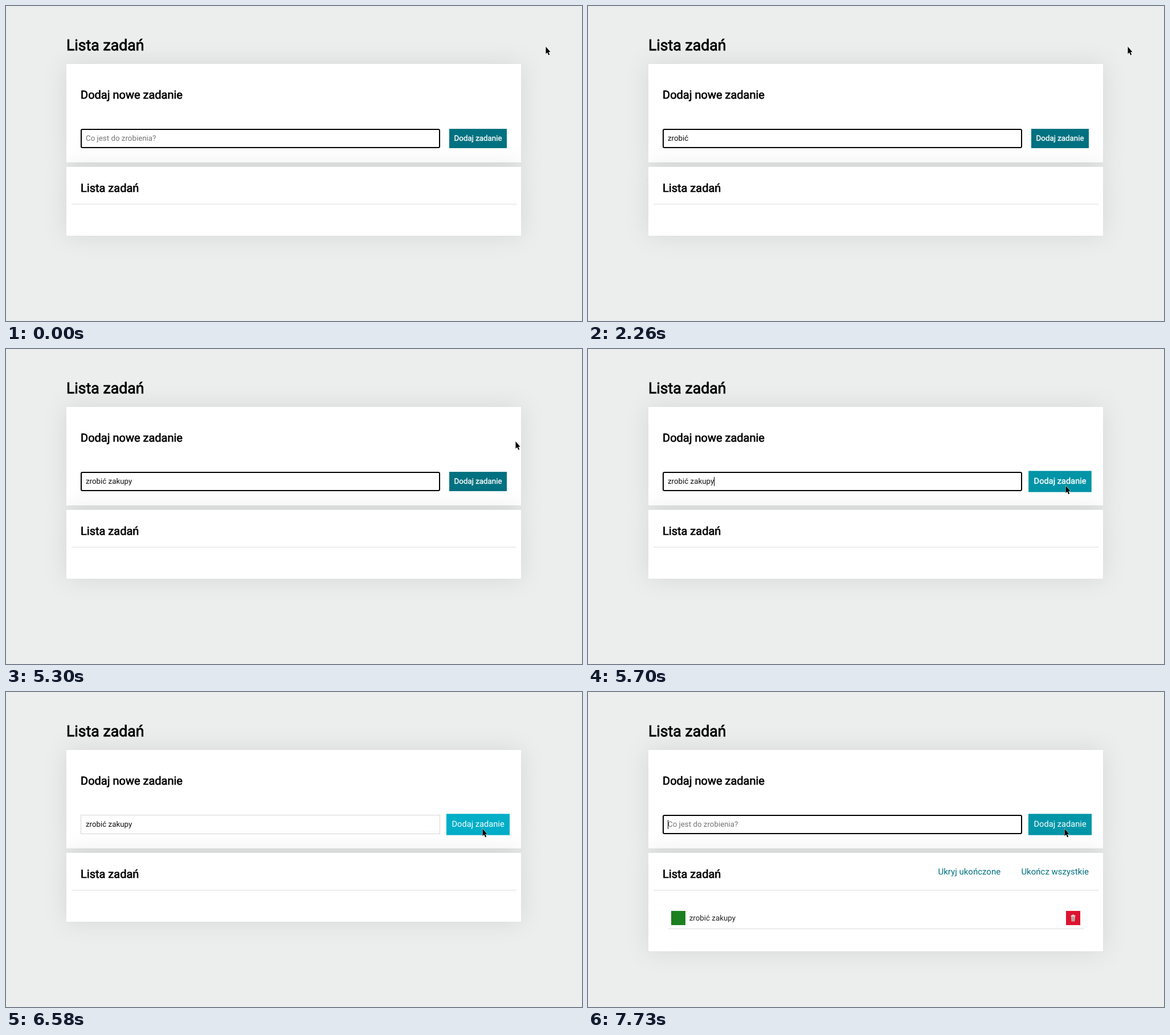
Animation of 1011x554 px, one loop 8000 ms. Source, as an HTML page:

```html
<!DOCTYPE html>
<html lang="pl">
<head>
<meta charset="utf-8">
<title>Lista zadań</title>
<style>
  html, body { margin: 0; width: 100%; height: 100%; overflow: hidden; background: #eceeed; }
  svg { display: block; width: 1011px; height: 554px; }
  text { font: 13.33px Roboto, Arial, sans-serif; text-rendering: geometricPrecision; white-space: pre; }
  .h1 { font-size: 26.67px; stroke: #000; stroke-width: .85px; }
  .h2 { font-size: 20px; stroke: #000; stroke-width: .68px; }
  .card { fill: #fff; filter: drop-shadow(0 0 21px rgba(0, 0, 0, .09)); }
  .link { font-size: 15px; fill: #007280; }
  .line { fill: #ddd; }
</style>
</head>
<body>
<svg viewBox="0 0 1011 554">
  <text class="h1" x="106" y="78">Lista zadań</text>

  <rect class="card" x="106" y="102" width="798" height="173"/>
  <text class="h2" x="131" y="163">Dodaj nowe zadanie</text>
  <rect id="field" fill="#fff"/>
  <text id="value" x="140" y="237"></text>
  <rect id="caret" y="225" width="1" height="16"/>
  <g id="button">
    <rect id="face" x="778" y="216" width="101" height="34"/>
    <text id="label" x="786.6" y="237" fill="#fff" stroke="#fff">Dodaj zadanie</text>
  </g>

  <rect id="list" class="card" x="106" y="283" width="798"/>
  <text class="h2" x="131" y="327">Lista zadań</text>
  <rect class="line" x="115" y="348" width="781" height="1"/>
  <g id="items">
    <text class="link" x="614.5" y="321">Ukryj ukończone</text>
    <text class="link" x="760.4" y="321">Ukończ wszystkie</text>
    <rect x="146" y="385" width="25" height="25" fill="#1b801f"/>
    <text x="177.7" y="402" fill="#222">zrobić zakupy</text>
    <rect x="839" y="385" width="25" height="25" fill="#dc1430"/>
    <path d="M848 394h7l-.8 9.5h-5.4z" fill="#d9c9c4"/>
    <path d="M847.5 393.3h8M850 392h3" stroke="#efe4e0" stroke-width="1.2"/>
    <path d="M849.8 395l.4 8M851.5 395v8M853.2 395l-.4 8" stroke="#85605e" stroke-width=".6"/>
    <rect class="line" x="140" y="416" width="731" height="1"/>
  </g>

  <path id="cursor" d="M.5 .5V13.2L3.2 10.7 5.3 15.5 7.2 14.6 5.2 9.9H8.6Z"
        stroke="#fff" stroke-width="1" paint-order="stroke"/>
</svg>
<script>
const LOOP = 8000;
const TASK = 'zrobić zakupy';
const KEYS = [510, 790, 990, 1090, 1190, 1460, 1730, 2360, 2460, 2790, 3960, 4090, 4290];
const BLINKS = [240, 2260, 2360, 3270, 3820, 4820, 5350, 5880, 6650, 7200, 7730];
const HOVER = 5490, PRESS = 6300, CLICK = 6650;
const BASE = [0, 113, 128], LIT = [0, 150, 168], ACTIVE = [0, 174, 200];

const $ = id => document.getElementById(id);
const clamp = v => Math.min(1, Math.max(0, v));
const mix = (a, b, k) => a + (b - a) * k;
const blend = (a, b, k) => a.map((v, i) => mix(v, b[i], k));
const ease = (t, start) => 1 - (1 - clamp((t - start) / 290)) ** 2.3;
const set = (el, attrs) => Object.entries(attrs).forEach(([k, v]) => el.setAttribute(k, v));

// The screen refreshes in steps while the pointer moves or the button fades.
function stepped(t) {
  for (const [from, to, gap] of [[5020, 5990, 68], [PRESS, 7000, 70]])
    if (t >= from && t < to) return from + Math.floor((t - from) / gap) * gap;
  return t;
}

function pointer(t) {
  if (t < 5020) return [947, 71];
  if (t >= 6100) return [836, 240];
  const s = clamp((t - 4960) / 670), u = s * s * (3 - 2 * s);
  const along = (a, b, c) => Math.round(mix(mix(a, b, u), mix(b, c, u), u));
  return [along(947, 893.5, 838), along(71, 170.5, 240)];
}

function drawField(t) {
  const count = t < CLICK ? KEYS.filter(k => k <= t).length : 0;
  const focused = t < PRESS || t >= CLICK;
  const value = $('value');
  value.textContent = count ? TASK.slice(0, count) : 'Co jest do zrobienia?';
  value.setAttribute('fill', count ? '#111' : '#757575');
  const w = focused ? 2 : 1;
  set($('field'), {
    x: 131 + w / 2, y: 216 + w / 2, width: 631 - w, height: 34 - w,
    rx: focused ? 2 : 0, stroke: focused ? '#000' : '#d5d5d5', 'stroke-width': w
  });
  const width = count ? value.getSubStringLength(0, count) : 0;
  const lit = BLINKS.filter(b => b <= t).length % 2 === 1;
  set($('caret'), { x: Math.floor(140 + width), visibility: focused && lit ? 'visible' : 'hidden' });
}

function drawButton(t) {
  const hover = ease(t, HOVER);
  const press = ease(t, PRESS) * (1 - ease(t, CLICK));
  const color = blend(blend(BASE, LIT, hover), ACTIVE, press).map(Math.round);
  const scale = 1 + .1 * hover;
  $('button').setAttribute('transform', `translate(828.5 233) scale(${scale}) translate(-828.5 -233)`);
  $('face').setAttribute('fill', `rgb(${color})`);
  $('label').setAttribute('stroke-width', t < 5840 ? .35 : 0);
}

function draw(time) {
  const t = stepped(time);
  drawField(time);
  drawButton(t);
  const added = time >= CLICK;
  $('list').setAttribute('height', added ? 173 : 121);
  $('items').setAttribute('visibility', added ? 'visible' : 'hidden');
  $('cursor').setAttribute('transform', `translate(${pointer(t)})`);
}

const start = performance.now();
function tick() {
  draw((performance.now() - start) % LOOP);
  requestAnimationFrame(tick);
}
tick();
</script>
</body>
</html>
```
